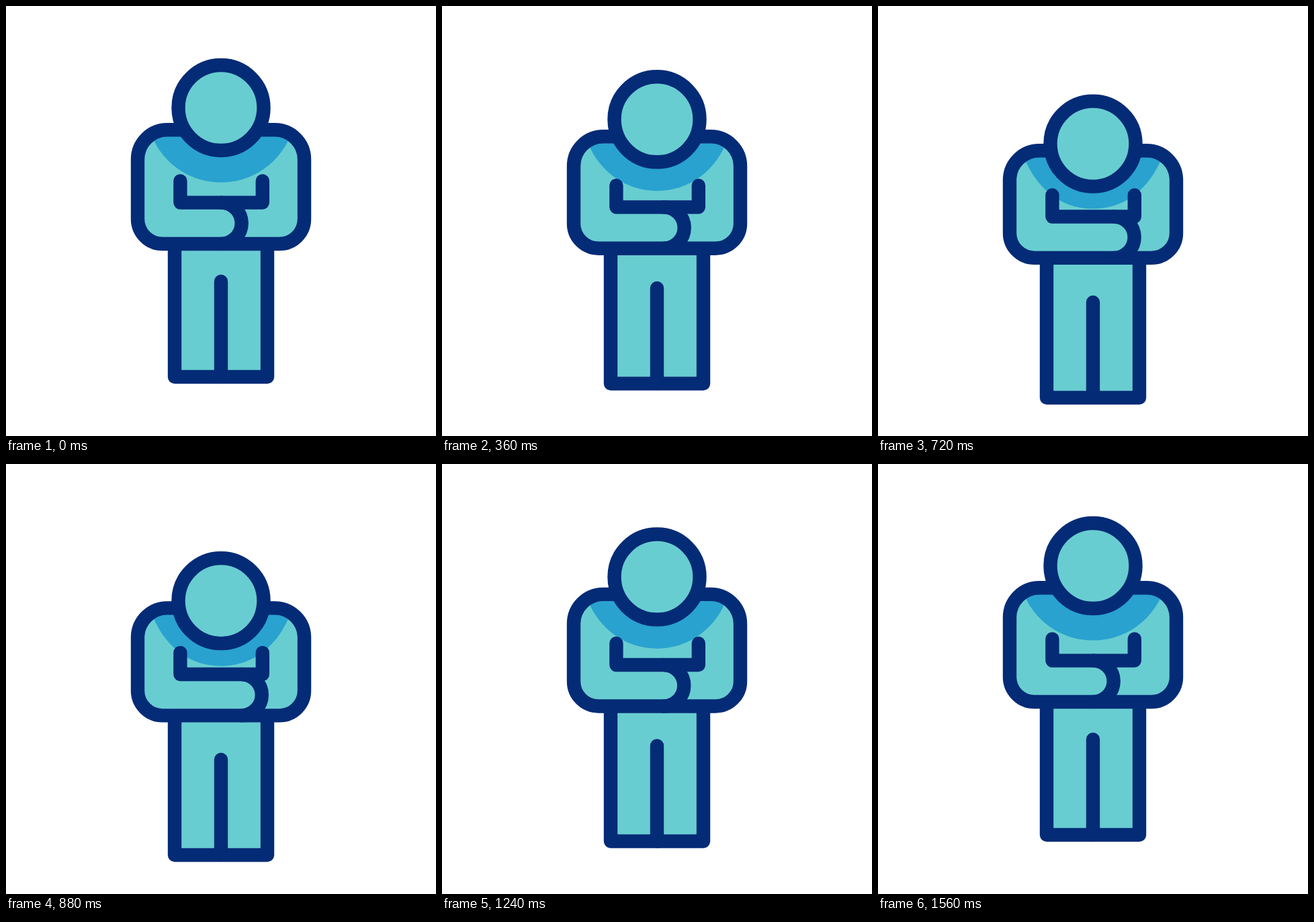
Animation of 640x640 px, one loop 1.64 s. Source, as an HTML page:

```html
<!DOCTYPE html>
<html lang="en">
<head>
<meta charset="utf-8">
<title>Bowing figure</title>
<style>
  html, body { margin: 0; width: 100%; height: 100%; overflow: hidden; background: #fff; }
  svg { display: block; width: 100vw; height: 100vh; }
  .line { stroke: #042b76; stroke-width: 20.4; stroke-linecap: round; stroke-linejoin: round; fill: none; }
  .skin { fill: #68cdd1; }
</style>
</head>
<body>
<svg viewBox="0 0 640 640">
  <g id="legs">
    <path class="line skin" d="M251 340V552H389V340"/>
    <path class="line" d="M320 410V552"/>
  </g>
  <path id="torso" class="skin"/>
  <path id="shade" fill="#29a2cf"/>
  <path id="outline" class="line"/>
  <path id="arms" class="line" d="M259.4 260.5V292.6H381.8V260.5"/>
  <path id="hand" class="line" d="M320 292.6A30.7 30.7 0 0 1 320 354"/>
  <circle id="head" class="line skin" cx="320" cy="151.5" r="63.5"/>
</svg>
<script>
const LOOP = 1640, STEP = 40;
const DOWN = 72, LOW = 756, UP = 1572;
const BOW = 53.8;
const el = id => document.getElementById(id);
const [legs, torso, shade, outline, arms, hand, head] =
  ["legs", "torso", "shade", "outline", "arms", "hand", "head"].map(el);

// Cubic easing with handles (a, 0) and (b, 1), solved by bisection.
function ease(x, a, b) {
  if (x <= 0) return 0;
  if (x >= 1) return 1;
  let lo = 0, hi = 1;
  for (let i = 0; i < 30; i++) {
    const t = (lo + hi) / 2, s = 1 - t;
    if (3 * a * s * s * t + 3 * b * s * t * t + t * t * t < x) lo = t;
    else hi = t;
  }
  return lo * lo * (3 - 2 * lo);
}

function bowAt(ms) {
  return ms < LOW
    ? ease((ms - DOWN) / (LOW - DOWN), 0.5525, 0.4666)
    : 1 - ease((ms - LOW) / (UP - LOW), 0.54, 0.46);
}

function move(node, x, y) {
  node.setAttribute("transform", `translate(${x} ${y})`);
}

function draw(ms) {
  const p = bowAt(ms), drop = BOW * p;
  const hip = drop * 0.577, waist = drop * 0.39;
  const top = 184.3 + hip, bottom = 354 + waist;

  move(head, 0, drop);
  move(legs, 0, hip);
  move(arms, 0, waist);
  move(hand, hip, waist);

  const body = `M240 ${top}H400A44 44 0 0 1 444 ${top + 44}V${bottom - 37}` +
    `A37 37 0 0 1 407 ${bottom}H233A37 37 0 0 1 196 ${bottom - 37}` +
    `V${top + 44}A44 44 0 0 1 240 ${top}Z`;
  torso.setAttribute("d", body);
  outline.setAttribute("d", body);

  const edge = 197 + hip, side = 237 + drop * 0.63;
  const low = 262.6 + drop * 0.73, reach = 43.8 + 5 * p;
  shade.setAttribute("d", `M240 ${top}L218.5 ${edge}` +
    `C236.4 ${side} ${320 - reach} ${low} 320 ${low}` +
    `C${320 + reach} ${low} 403.6 ${side} 421.5 ${edge}L400 ${top}Z`);
}

const start = performance.now();
function tick(now) {
  const ms = Math.max(0, now - start) % LOOP;
  draw(Math.floor(ms / STEP) * STEP);
  requestAnimationFrame(tick);
}
draw(0);
requestAnimationFrame(tick);
</script>
</body>
</html>
```
